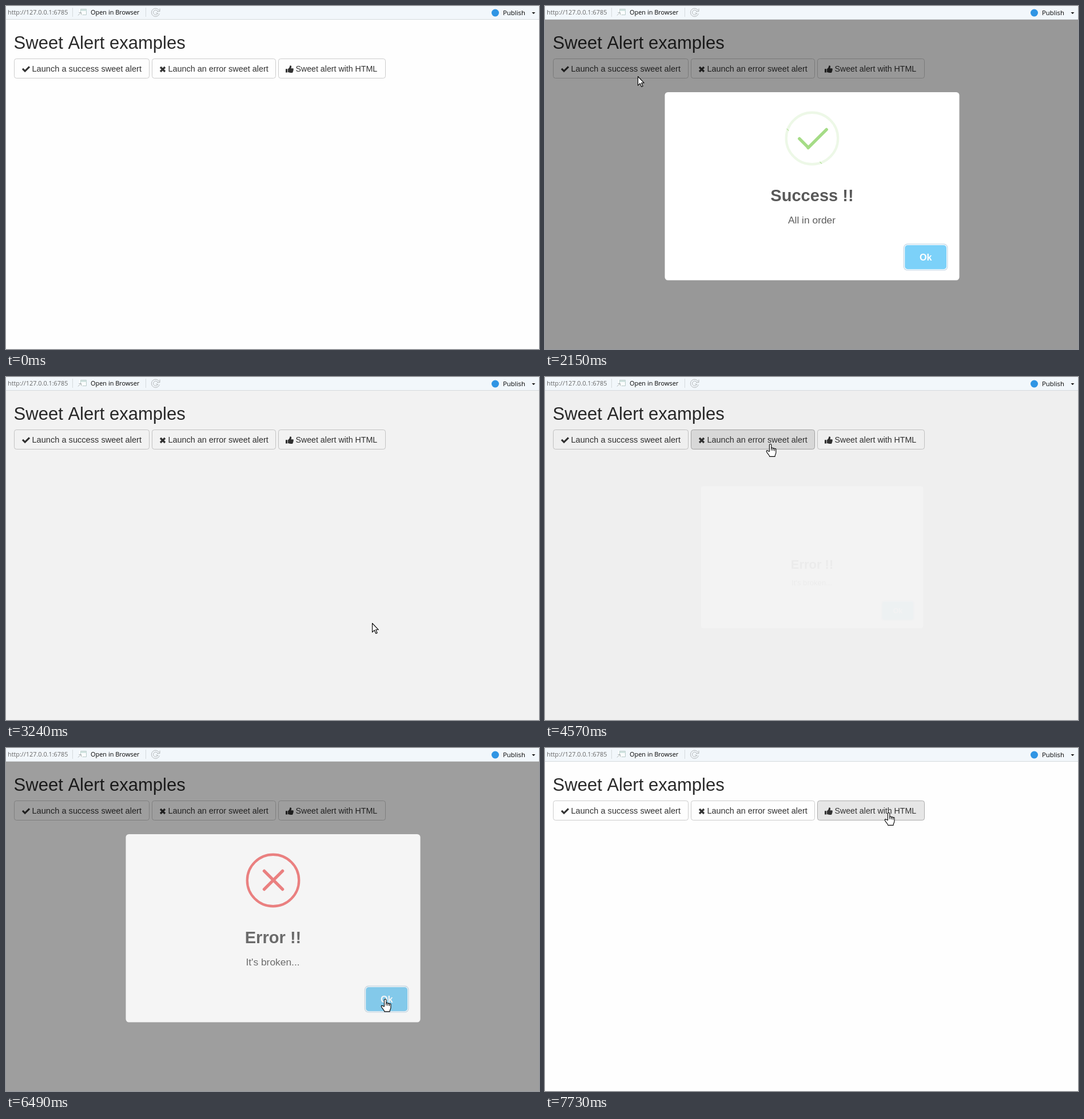
These frames come from a looping animation (932x601 px, 8 s). An HTML page with a canvas:

```html
<!DOCTYPE html>
<html lang="en">
<head>
<meta charset="utf-8">
<title>Sweet Alert examples</title>
<style>
html, body { margin: 0; width: 100%; height: 100%; overflow: hidden; background: #fefefe; }
canvas { display: block; }
</style>
</head>
<body>
<canvas id="stage" width="932" height="601"></canvas>
<script>
const W = 932, H = 601, LOOP = 8000, BAR = 24;
const SANS = '"Liberation Sans", Arial, sans-serif';
const UI = '"Open Sans", "Noto Sans", sans-serif';
const ZOOM = 1.077;
const GREEN = '#a5dc86', RED = '#f27474';

const main = document.getElementById('stage').getContext('2d');
const newLayer = () => Object.assign(document.createElement('canvas'), { width: W, height: H }).getContext('2d');
const veil = newLayer(), box = newLayer();

const bursts = [
  [0, 0, 2], [200, 980, 11], [1220, 1220, 2], [1380, 2150, 11], [2240, 3010, 11],
  [3070, 3850, 11], [3940, 4180, 4], [4410, 5100, 10], [5260, 6030, 11],
  [6100, 6100, 2], [6330, 6330, 2], [6490, 6640, 3], [6790, 7580, 11], [7660, 7730, 2]
];
// Pointer moves: start, end, x, y.
const moves = [
  [200, 980, 162, 116], [1990, 2000, 162, 123], [2163, 3010, 640, 431],
  [3304, 3850, 400, 135], [3863, 4180, 394, 117], [5183, 6030, 656.5, 435],
  [6099, 6100, 663, 439.5], [6711, 7580, 597, 121], [7590, 7730, 601, 113]
];
const buttons = [
  { x: 14, w: 237, label: 'Launch a success sweet alert', tx: 45.5, size: 14.6, icon: drawCheck, down: 1220, up: 1380 },
  { x: 255, w: 217, label: 'Launch an error sweet alert', tx: 283.5, size: 14.4, icon: drawCross, down: 4410, up: 4480 },
  { x: 476, w: 188, label: 'Sweet alert with HTML', tx: 506.5, size: 14.2, icon: drawThumb, down: LOOP, up: LOOP }
];
const dialogs = [
  { open: 1412, leave: 1990, down: 3010, close: 3049, end: 3370, owner: 0, title: 'Success !!', text: 'All in order', icon: successIcon },
  { open: 4524, leave: 5260, down: 6330, close: 6468, end: 6640, owner: 1, title: 'Error !!', text: "It's broken...", icon: errorIcon }
];

const clamp = v => Math.max(0, Math.min(1, v));

function bezier(x1, y1, x2, y2) {
  const at = (a, b, s) => 3 * a * s * (1 - s) ** 2 + 3 * b * s * s * (1 - s) + s ** 3;
  return x => {
    if (x <= 0) return 0;
    if (x >= 1) return 1;
    let lo = 0, hi = 1;
    for (let i = 0; i < 24; i++) {
      const mid = (lo + hi) / 2;
      if (at(x1, x2, mid) < x) lo = mid; else hi = mid;
    }
    return at(y1, y2, lo);
  };
}
const ease = bezier(.25, .1, .25, 1);
const easeIn = bezier(.42, 0, 1, 1);
const easeInOut = bezier(.42, 0, .58, 1);

// Stops are [position, ...values]; every segment is eased on its own.
function keyframes(p, stops, fn = ease) {
  p = clamp(p);
  let i = 1;
  while (i < stops.length - 1 && p > stops[i][0]) i++;
  const a = stops[i - 1], b = stops[i];
  const k = fn((p - a[0]) / (b[0] - a[0]));
  return a.slice(1).map((v, j) => v + (b[j + 1] - v) * k);
}

function snap(t) {
  const [a, b, n] = bursts.filter(r => r[0] <= t).pop();
  const step = (b - a) / (n - 1) || 1;
  return Math.min(b, a + step * Math.floor((t - a + 8) / step));
}

function pointerAt(t) {
  let x = 748, y = 573;
  for (const [a, b, nx, ny] of moves) {
    const k = easeInOut((t - a) / (b - a));
    x += (nx - x) * k;
    y += (ny - y) * k;
  }
  return { x, y };
}

function text(c, s, x, y, font, color, align = 'left') {
  c.font = font;
  c.fillStyle = color;
  c.textAlign = align;
  c.fillText(s, x, y);
}

function rounded(c, x, y, w, h, r, fill, stroke) {
  c.beginPath();
  c.roundRect(x, y, w, h, r);
  if (fill) { c.fillStyle = fill; c.fill(); }
  if (stroke) { c.strokeStyle = stroke; c.lineWidth = 1; c.stroke(); }
}

function line(c, path, color, width) {
  c.strokeStyle = color;
  c.lineWidth = width;
  c.stroke(new Path2D(path));
}

function drawCheck(c) { line(c, 'M29 109.8L33.2 114L41 106.4', '#333', 3.1); }
function drawCross(c) { line(c, 'M270 107L278 115M278 107L270 115', '#333', 3.2); }
function drawThumb(c) {
  c.fillStyle = '#333';
  c.fill(new Path2D('M489 110.2h3.2v6.2h-3.2zM493 110.2c1.6-.8 2.6-2.4 3-4 .2-1.2.3-2 1.2-2 ' +
    '1.6 0 2.2 1.4 1.9 2.8l-.7 2.2h3c1.6 0 1.9 1.6 1 2.4.5.8.3 1.6-.3 2 .3.8 0 1.5-.6 1.8 ' +
    '.1 1.2-.6 1.6-1.8 1.6h-2.4c-1.8 0-2.6-.8-4.3-.9z'));
}

function toolbar(c) {
  c.fillStyle = '#f2f7fb';
  c.fillRect(0, 0, W, 23);
  c.fillStyle = '#d5dadd';
  c.fillRect(0, 23, W, 1);
  c.fillRect(116, 3, 1, 16);
  c.fillRect(244, 3, 1, 16);
  text(c, 'http://127.0.0.1:6785', 3, 15, '10.85px ' + UI, '#666');
  text(c, 'Open in Browser', 148, 15, '10.95px ' + UI, '#000');
  text(c, 'Publish', 869, 16, '11.4px ' + UI, '#000');

  c.fillStyle = '#fbfdfd';
  c.fillRect(128, 5, 13, 11);
  line(c, 'M130.5 11V5.5h10v10h-7', '#b9cbc9', 1);
  line(c, 'M130 7.5h11', '#c3dbd7', 2);
  line(c, 'M126 16.5l5-5M127.5 11.5h4v4', '#a9b1b3', 1);

  line(c, 'M268 8.2A7.2 7.2 0 1 0 268.4 13.4', '#b4b8ba', 1);
  line(c, 'M265.4 9.2A4.2 4.2 0 1 0 265.8 12.5H262M269 4.5v5h-5', '#b4b8ba', 1);

  c.fillStyle = '#3095e4';
  c.beginPath();
  c.arc(855.5, 12, 6.5, 0, 7);
  c.fill();
  c.fillStyle = '#111';
  c.fill(new Path2D('M919.5 11h6l-3 3z'));
}

function page(c, t, hovered) {
  c.fillStyle = '#fefefe';
  c.fillRect(0, 0, W, H);
  toolbar(c);
  text(c, 'Sweet Alert examples', 13.5, 75, '31.05px ' + SANS, '#2a2a2a');
  buttons.forEach((b, i) => {
    const hot = hovered === i, pressed = t >= b.down && t < b.up;
    const fill = pressed ? '#d4d4d4' : hot ? '#e6e6e6' : '#fefefe';
    rounded(c, b.x + .5, 92.5, b.w - 1, 34, 3.8, fill, hot ? '#adadad' : '#ccc');
    if (pressed) {
      c.fillStyle = 'rgba(0,0,0,.07)';
      c.fillRect(b.x + 1, 93, b.w - 2, 3);
    }
    b.icon(c);
    text(c, b.label, b.tx, 115, b.size + 'px ' + SANS, '#333');
  });
}

function ring(c, color) {
  c.strokeStyle = color;
  c.lineWidth = 4;
  c.beginPath();
  c.arc(40, 40, 42, 0, 7);
  c.stroke();
}

function bar(c, x, y, w, deg, color) {
  if (w <= 0) return;
  c.save();
  c.translate(x + w / 2, y + 2.5);
  c.rotate(deg * Math.PI / 180);
  rounded(c, -w / 2, -2.5, w, 5, 2, color);
  c.restore();
}

function halfDisc(c, x, y, deg, left) {
  const a = deg * Math.PI / 180;
  c.fillStyle = '#fff';
  c.beginPath();
  c.arc(x, y, 60, a - Math.PI / 2, a + Math.PI / 2, left);
  c.fill();
}

function successIcon(c, age) {
  ring(c, GREEN);
  halfDisc(c, 27, 53, -45, true);
  const [turn] = keyframes(age / 4250, [[0, -45], [.05, -45], [.12, -405], [1, -405]], easeIn);
  halfDisc(c, 30, 49, turn, false);
  c.save();
  c.translate(30.5, 53);
  c.rotate(-Math.PI / 4);
  c.fillStyle = '#fff';
  c.fillRect(-1.6, -45, 4.6, 92);
  c.restore();
  ring(c, 'rgba(165,220,134,.2)');

  const p = age / 750;
  const [tw, tx, ty] = keyframes(p, [[0, 0, 1, 19], [.54, 0, 1, 19], [.7, 50, -8, 37], [.84, 17, 21, 48], [1, 25, 14, 45]]);
  const [lw, lr, ly] = keyframes(p, [[0, 0, 46, 54], [.65, 0, 46, 54], [.84, 55, 0, 35], [1, 47, 8, 38]]);
  bar(c, tx, ty, tw, 45, GREEN);
  bar(c, 80 - lr - lw, ly, lw, -45, GREEN);
}

function errorIcon(c, age) {
  const p = age / 500;
  const [tilt, shown] = keyframes(p, [[0, 100, 0], [1, 0, 1]]);
  c.globalAlpha = shown;
  c.translate(0, 40);
  c.scale(1, Math.cos(tilt * Math.PI / 180));
  c.translate(0, -40);
  ring(c, RED);

  const [size, drop] = keyframes(p, [[0, .4, 26], [.5, .4, 26], [.8, 1.15, -6], [1, 1, 0]]);
  const [alpha] = keyframes(p, [[0, 0], [.5, 0], [1, 1]]);
  c.globalAlpha = shown * alpha;
  c.translate(40, drop);
  c.scale(size, size);
  c.translate(-40, 0);
  bar(c, 17, 37, 47, 45, RED);
  bar(c, 17, 37, 47, -45, RED);
}

function modal(c, d, t, hot) {
  const age = t - d.open;
  const [size] = keyframes(age / 300, [[0, 1], [.01, .5], [.45, 1.05], [.8, .95], [1, 1]]);
  c.clearRect(0, 0, W, H);
  c.save();
  c.translate(467, 315.7);
  c.scale(size, size);
  c.translate(-467, -315.7);
  rounded(c, 209.5, 151, 515, 329.5, 5.4, '#fff');

  c.save();
  c.translate(467, 232);
  c.scale(ZOOM, ZOOM);
  c.translate(-40, -40);
  d.icon(c, age);
  c.restore();

  text(c, d.title, 467, 342, 'bold 29.08px ' + SANS, 'rgba(0,0,0,.65)', 'center');
  text(c, d.text, 466.5, 380.5, '17.4px ' + SANS, 'rgba(0,0,0,.64)', 'center');
  rounded(c, 626.8, 416.6, 77.6, 47, 7, 'rgba(43,114,165,.29)');
  rounded(c, 628, 417.8, 75.2, 44.6, 6, '#fff');
  const pressed = t >= d.down && t < d.close;
  rounded(c, 629.2, 419, 72.8, 42.2, 5, pressed ? '#70bce0' : hot ? '#78cbf2' : '#7cd1f9');
  text(c, 'Ok', 665.7, 445.5, 'bold 16.15px ' + SANS, '#fff', 'center');
  c.restore();
}

// The modal fades inside the veil, and the veil fades as one group.
function dialog(c, d, t, hot) {
  const fade = ms => ease((t - d.open) / ms) * (1 - ease((t - d.close) / ms));
  modal(box, d, t, hot);
  veil.clearRect(0, 0, W, H);
  veil.fillStyle = 'rgba(0,0,0,.4)';
  veil.fillRect(0, BAR, W, H - BAR);
  veil.globalAlpha = fade(200);
  veil.drawImage(box.canvas, 0, 0);
  veil.globalAlpha = 1;
  c.globalAlpha = fade(300);
  c.drawImage(veil.canvas, 0, 0);
  c.globalAlpha = 1;
}

const ARROW = new Path2D('M.5 .5V16.2L4.2 12.7L6.8 18.5L9.1 17.5L6.6 11.8H11.3Z');
const HAND = new Path2D('M-1.6 13.5V2.2a1.7 1.7 0 0 1 3.4 0V8a1.5 1.5 0 0 1 2.9.6a1.5 1.5 0 0 1 2.8.7' +
  'a1.3 1.3 0 0 1 2.4 1V15.2c0 3-1.8 3.8-1.9 7.2H-1.2c0-2.6-4.4-5.4-5.5-8.8c-.5-1.9 1.6-2.3 2.7-1z');
const KNUCKLES = new Path2D('M1.8 7.5V11.8M4.7 8.6V12M7.5 9.3V12.4');

function pointer(c, { x, y }, hand) {
  const shape = hand ? HAND : ARROW;
  c.save();
  c.translate(x, y);
  c.fillStyle = '#fff';
  c.strokeStyle = '#000';
  c.lineWidth = 1.1;
  c.lineJoin = 'round';
  c.fill(shape);
  c.stroke(shape);
  if (hand) c.stroke(KNUCKLES);
  c.restore();
}

function draw(now) {
  const t = snap(now % LOOP);
  const pos = pointerAt(t);
  const inside = (x, y, w, h) => pos.x >= x && pos.x <= x + w && pos.y >= y && pos.y <= y + h;
  const d = dialogs.find(e => t >= e.open && t < e.end);
  let hovered = -1, hotOk = false;
  if (d) {
    if (t < d.leave) hovered = d.owner;
    hotOk = t < d.close + 40 && inside(629, 419, 73, 42);
  } else if (t >= 200) {
    hovered = buttons.findIndex(b => inside(b.x, 92, b.w, 35));
  }
  page(main, t, hovered);
  if (d) dialog(main, d, t, hotOk);
  if (t >= 200) pointer(main, pos, hovered >= 0 || hotOk);
}

const start = performance.now();
function tick() {
  draw(performance.now() - start);
  requestAnimationFrame(tick);
}
tick();
</script>
</body>
</html>
```
